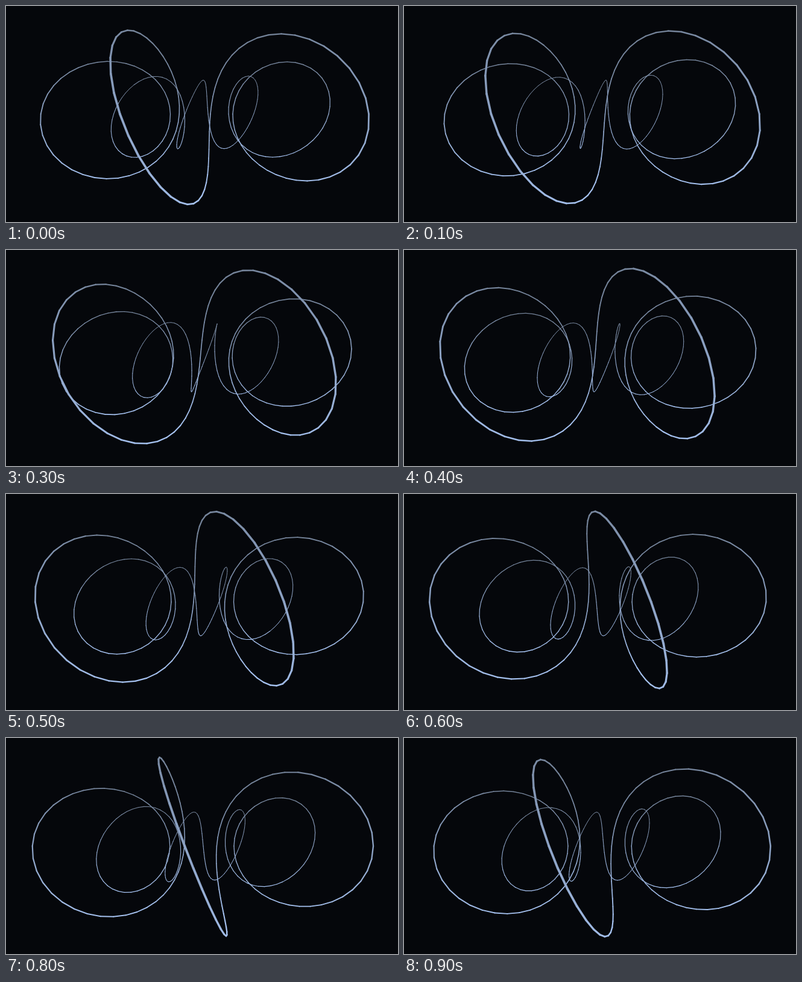
Write an HTML page with a canvas that moves like this. It is 650 px wide and 360 px high and loops after 1 s.

```html
<!DOCTYPE html>
<html lang="en">
<head>
<meta charset="utf-8">
<title>Turning coil</title>
<style>
  html, body { margin: 0; width: 100%; height: 100%; overflow: hidden; background: #05070b; }
  canvas { display: block; width: 650px; height: 360px; }
</style>
</head>
<body>
<canvas id="stage" width="650" height="360"></canvas>
<script>
const ctx = document.getElementById('stage').getContext('2d');
const W = 650, H = 360;
const TURNS = 7, SEGMENTS = 280;          // windings around the ring, straight pieces
const RING = 131.25, TUBE = 78.75;        // radii
const EYE = H / 2 / Math.tan(Math.PI / 6); // 60 degree view, unit scale at the centre
const LINE = 1.31;                        // line weight at unit scale
const STEPS = 10, LOOP = 1000;
const HIGH = [116, 131, 153], LOW = [166, 194, 240];

// Projected point of the coil, with its scale and height in the tube (-1 to 1)
function point(i, spin) {
  const a = i / SEGMENTS * Math.PI * 2;
  const wind = TURNS * a + Math.PI / 2;
  const radius = RING + TUBE * Math.cos(wind);
  const level = Math.sin(wind);
  const scale = EYE / (EYE - radius * Math.cos(a - spin));
  return {
    x: W / 2 + radius * Math.sin(a - spin) * scale,
    y: H / 2 + TUBE * level * scale,
    scale, level
  };
}

function shade(level) {
  const k = (level + 1) / 2;
  return `rgb(${HIGH.map((c, i) => Math.round(c + (LOW[i] - c) * k))})`;
}

function draw(progress) {
  const spin = progress * Math.PI * 2 / TURNS;
  const points = Array.from({ length: SEGMENTS }, (_, i) => point(i, spin));
  const pieces = points.map((p, i) => {
    const q = points[(i + 1) % SEGMENTS];
    return { p, q, scale: (p.scale + q.scale) / 2, level: (p.level + q.level) / 2 };
  }).sort((a, b) => a.scale - b.scale);

  ctx.fillStyle = '#05070b';
  ctx.fillRect(0, 0, W, H);
  ctx.lineCap = 'round';
  for (const { p, q, scale, level } of pieces) {
    ctx.strokeStyle = shade(level);
    ctx.lineWidth = Math.max(1, scale * LINE);
    ctx.beginPath();
    ctx.moveTo(p.x, p.y);
    ctx.lineTo(q.x, q.y);
    ctx.stroke();
  }
}

let shown = -1;
function tick() {
  const step = Math.floor(performance.now() % LOOP / LOOP * STEPS);
  if (step !== shown) {
    shown = step;
    draw(step / STEPS);
  }
  requestAnimationFrame(tick);
}
tick();
</script>
</body>
</html>
```
